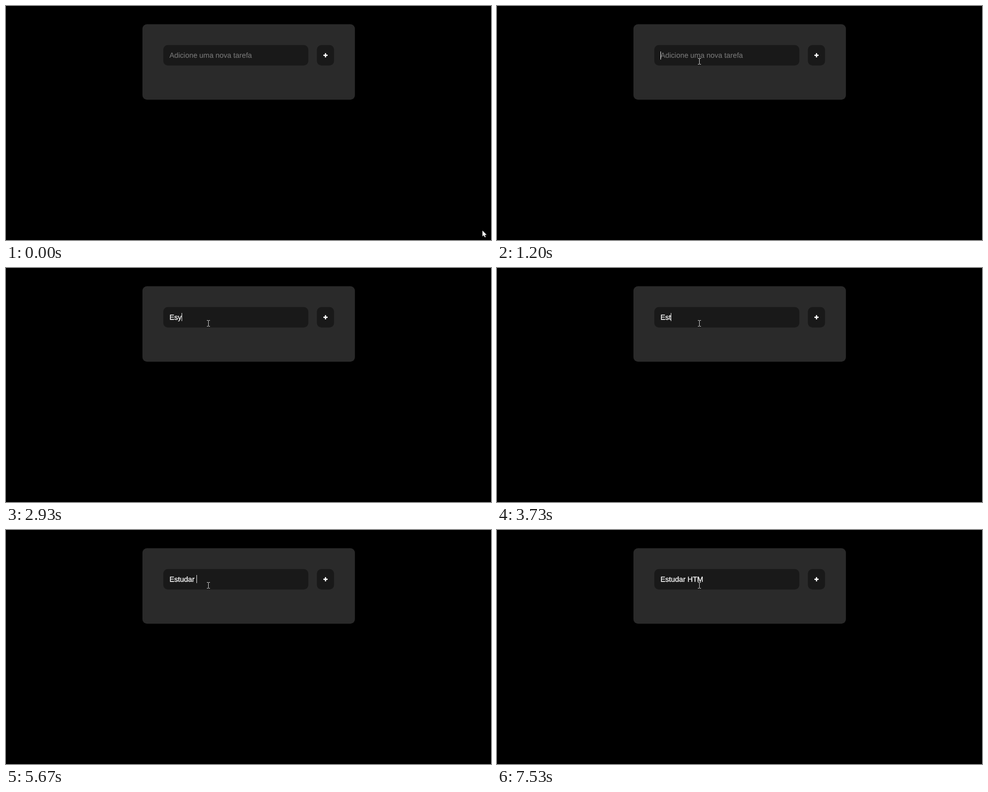
Animation of 1077x520 px, one loop 8000 ms. Source, as an HTML page:

```html
<!DOCTYPE html>
<html lang="pt-BR">
<head>
<meta charset="utf-8">
<title>Lista de tarefas</title>
<style>
  html, body { margin: 0; width: 100%; height: 100%; overflow: hidden; background: #000; }
  svg { display: block; }
  .field { fill: #191919; }
  text {
    font: 16.16px "Liberation Sans", Arial, sans-serif;
    text-rendering: geometricPrecision;
    white-space: pre;
  }
  #hint { fill: #757575; stroke: #757575; stroke-width: .15; }
  #typed { fill: #fff; stroke: #fff; stroke-width: .35; }
  #caret, #arrow, .plus { fill: #fff; }
</style>
</head>
<body>
<svg width="1077" height="520" viewBox="0 0 1077 520">
  <rect x="303" y="40.5" width="471.8" height="167.7" rx="10" fill="#2a2a2a"/>
  <rect class="field" x="349.3" y="86.7" width="322" height="45.5" rx="10"/>
  <rect class="field" x="690.4" y="86.7" width="38" height="45.5" rx="10"/>
  <g class="plus">
    <rect x="704.8" y="108.1" width="9.4" height="2.8" rx=".7"/>
    <rect x="708.1" y="104.8" width="2.8" height="9.4" rx=".7"/>
  </g>
  <text id="hint" x="362.9" y="115">Adicione uma nova tarefa</text>
  <text id="typed" x="362.9" y="115"></text>
  <rect id="caret" width="1" height="18" shape-rendering="crispEdges"/>
  <path id="arrow" d="M0 0V13L3 10.3L5.3 15L7.2 14.2L5.2 9.7L9.3 9.4Z"/>
  <path id="beam" d="M446 116.5h3M450 116.5h3M449.5 117v12M446 129.5h3M450 129.5h3"
        fill="none" stroke="#e6e6e6" shape-rendering="crispEdges"/>
</svg>
<script>
const LOOP = 8000;
const BEAM_FROM = 1070;

// time, pointer tip x, y
const moves = [
  [0, 1058, 499], [70, 1010, 476], [130, 885, 420], [200, 760, 366], [270, 708, 344],
  [600, 707, 343], [670, 655, 292], [730, 570, 215], [800, 502, 160], [870, 477, 140.5]
];

// time, text, caret x (null while blinked off)
const edits = [
  [0, "", null], [1200, "", 363], [1730, "", null], [2270, "", 363],
  [2670, "E", 373], [2930, "Esy", 390], [3470, "Esy", null],
  [3530, "Es", 381], [3730, "Est", 386], [3930, "Estu", 395], [4070, "Estud", 404],
  [4270, "Estuda", 413], [4530, "Estudar", 418], [5000, "Estudar", null],
  [5530, "Estudar", 418], [5670, "Estudar ", 423], [6200, "Estudar ", null],
  [6530, "Estudar H", 434], [6730, "Estudar HT", 445],
  [7000, "Estudar HTM", 458], [7530, "Estudar HTM", null]
];

const el = id => document.getElementById(id);
const [hint, typed, caret, arrow, beam] = ["hint", "typed", "caret", "arrow", "beam"].map(el);
const show = (node, on) => node.setAttribute("visibility", on ? "visible" : "hidden");
const latest = (steps, t) => steps.findLast(step => step[0] <= t);

function draw(now) {
  const t = now % LOOP;
  const [, x, y] = latest(moves, t);
  const [, text, caretX] = latest(edits, t);

  arrow.setAttribute("transform", `translate(${x} ${y})`);
  show(arrow, t < BEAM_FROM);
  show(beam, t >= BEAM_FROM);

  typed.textContent = text;
  show(hint, !text);
  show(caret, caretX !== null);
  caret.setAttribute("x", caretX ?? 0);
  caret.setAttribute("y", text ? 100 : 101);
}

function tick() {
  draw(performance.now());
  requestAnimationFrame(tick);
}
tick();
</script>
</body>
</html>
```
